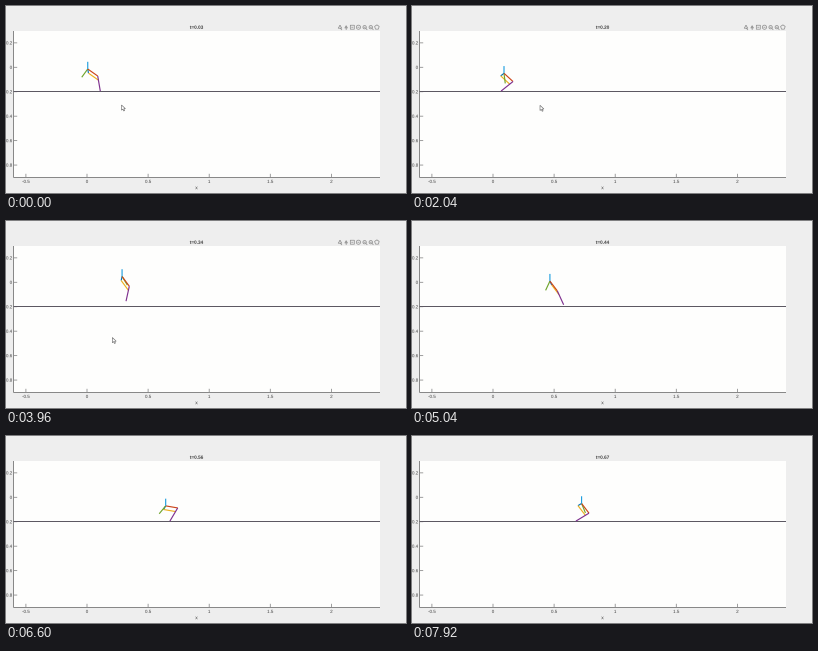
These frames come from a looping animation (400 px wide and 187 px high, 8 s). A matplotlib script:

```python
import numpy as np
import matplotlib
import matplotlib.pyplot as plt
from matplotlib.animation import FuncAnimation
from matplotlib.patches import PathPatch, Polygon, Rectangle
from matplotlib.path import Path
from matplotlib.textpath import TextPath

W, H, DPI = 400, 187, 100
PX = 72 / DPI                      # points per pixel
UNIT, X0, Y0 = 122.2, 81.0, 61.3   # pixels per metre, place of the origin
LEFT, RIGHT, TOP, BOTTOM = 7.5, 374, 25, 171.5
GROUND = 85.5
THIGH, SHANK, CRANK, ARM, TORSO = 12.2, 15.3, 4.2, 10.2, 7.2
INK, FRAME = "#404040", "#888888"

STEP_MS = 120
HOLDS = (12, 25, 47, 54, 62)       # steps at which nothing moves on
CLOCK = [0, 10, 23, 31, 61], [0.03, 0.14, 0.27, 0.34, 0.67]
TOOLBAR_OFF = 4800
APEX, LIFT_OFF, TOUCH_DOWN = 0.345, 0.278, 0.55

fig = plt.figure(figsize=(W / DPI, H / DPI), dpi=DPI, facecolor="#eeeeee")
ax = fig.add_axes([0, 0, 1, 1])
ax.set_xlim(0, W)
ax.set_ylim(H, 0)
ax.axis("off")


def line(xs, ys, color, width=1.0, z=2):
    return ax.plot(xs, ys, color=color, lw=width * PX, zorder=z, snap=False,
                   solid_capstyle="butt")[0]


def glyphs(x, y, text, size=4.5, weight="normal", align=0.5):
    """Outline of a text whose digits are centred on height y."""
    path = TextPath((0, 0), text, size=size,
                    prop={"family": "Liberation Sans", "weight": weight})
    box = path.get_extents()
    shift = [x - box.x0 - align * box.width, y + 0.35 * size]
    return Path(path.vertices * [1, -1] + shift, path.codes)


def label(*args, **kw):
    return ax.add_patch(PathPatch(glyphs(*args, **kw), fc=INK, lw=0, zorder=3))


def draw_axes():
    ax.add_patch(Rectangle((LEFT, TOP), RIGHT - LEFT, BOTTOM - TOP,
                           fc="#fefefd", ec="none", zorder=0))
    line([LEFT, LEFT], [TOP, BOTTOM], FRAME)
    line([LEFT, RIGHT], [BOTTOM, BOTTOM], FRAME)
    for v in np.arange(-0.5, 2.1, 0.5):
        x = X0 + UNIT * v
        line([x, x], [BOTTOM, BOTTOM - 3.7], FRAME, 0.8)
        label(x, 175.4, f"{v:g}")
    for v in np.arange(1, -5, -1) * 0.2:
        y = Y0 - UNIT * v
        line([LEFT, LEFT + 3.7], [y, y], FRAME, 0.8)
        label(6, y, f"{v:.1g}", align=1)
    label(190.5, 181.5, "x", 5)
    line([LEFT, RIGHT], [GROUND, GROUND], "#5c5862")


def draw_toolbar():
    parts = []

    def stroke(xs, ys):
        parts.append(line(xs, ys, "#8a8a8a", 0.7))

    def ring(x, y, sides, r, turn=0.0):
        a = np.linspace(0, 2 * np.pi, sides + 1) + turn
        stroke(x + r * np.sin(a), y - r * np.cos(a))

    # pencil, data tip, turn, pan, zoom in, zoom out, home
    xs = 334 + 6.15 * np.arange(7)
    for x, sides, r in zip(xs, (3, 3, 4, 16, 16, 16, 5),
                           (2, 1.5, 2.8, 2.1, 1.7, 1.7, 2.4)):
        ring(x, 21.2, sides, r, np.pi / 4 if sides == 4 else 0)
    stroke([xs[0], xs[0] + 2], [22, 24])
    stroke([xs[1], xs[1]], [21, 24])
    for x in xs[2:6]:
        stroke([x - 1, x + 1], [21.2, 21.2])
    for x in xs[4:6]:
        stroke([x + 1.2, x + 2.7], [22.4, 23.9])
    return parts


def wave(t, crest, rise, fall):
    """Cosine with its own period on each side of the crest."""
    return np.cos(2 * np.pi * (t - crest) / (rise if t < crest else fall))


def hip_at(t):
    u = t - 0.39
    return np.array([127.1 + 126 * u + 11.2 * np.sin(2 * np.pi * u / 0.72),
                     63.0 - 7.6 * wave(t, APEX, 0.42, 0.50)])


def foot_at(t):
    planted = np.interp(t, [0.03, 0.12, LIFT_OFF], [94.3, 87.8, 90.3])
    s = np.clip((t - LIFT_OFF) / (TOUCH_DOWN - LIFT_OFF), 0, 1)
    swing = 1 - (1 - s) ** 2
    return np.array([planted + 73.6 * swing,
                     GROUND - 0.4 - 5.4 * np.sin(np.pi * swing) ** 2])


def polar(length, angle):
    return length * np.array([np.sin(angle), np.cos(angle)])


def joints(t):
    hip, foot = hip_at(t), foot_at(t)
    reach = foot - hip
    d = min(np.hypot(*reach), THIGH + SHANK - 0.05)
    bend = np.arccos((THIGH**2 + d**2 - SHANK**2) / (2 * THIGH * d))
    knee = hip + polar(THIGH, np.arctan2(*reach) + bend)
    shin = (foot - knee) / np.hypot(*(foot - knee)) * CRANK
    arm = np.radians(45 * wave(t, 0.29, 0.42, 0.45) - 3)
    return {
        "crank": (hip, hip + shin),
        "rod": (hip + shin, knee + shin),
        "thigh": (hip, knee),
        "shank": (knee, foot),
        "arm": (hip, hip + polar(ARM, arm)),
        "torso": (hip, hip - [0, TORSO]),
    }


def pointer_at(ms):
    when = [0, 840, 3600, 3960, 4500]
    return [np.interp(ms, when, [115.5, 128, 128, 106.3, -8]),
            np.interp(ms, when, [99, 99.3, 99.3, 116.5, 180])]


draw_axes()
tools = draw_toolbar()
title = label(190.5, 21.2, "t=0", 4.7, weight="bold")
COLORS = {"crank": "#0072bd", "rod": "#edb120", "arm": "#6fa52c",
          "thigh": "#cc4419", "shank": "#7e2f8e", "torso": "#1f9fe0"}
links = {name: line([], [], c, 1.15, 4) for name, c in COLORS.items()}
ARROW = np.array([[0, 0], [0, 5.2], [1.3, 4.1], [2.2, 6], [3.1, 5.6],
                  [2.3, 3.8], [3.9, 3.7]])
pointer = ax.add_patch(Polygon(ARROW, fc="white", ec="#666666",
                               lw=0.6 * PX, zorder=6))


def update(i):
    step = min(i // 3, 66)
    ms = step * STEP_MS
    t = np.interp(step - sum(h <= step for h in HOLDS), *CLOCK)
    title.set_path(glyphs(190.5, 21.2, f"t={t:.2f}", 4.7, weight="bold"))
    for name, ends in joints(t).items():
        links[name].set_data(*np.transpose(ends))
    pointer.set_xy(ARROW + pointer_at(ms))
    for part in tools:
        part.set_visible(ms < TOOLBAR_OFF)
    return [title, pointer, *links.values(), *tools]


anim = FuncAnimation(fig, update, frames=200, interval=40, repeat=True,
                     repeat_delay=0, blit=False)
plt.show()
```
